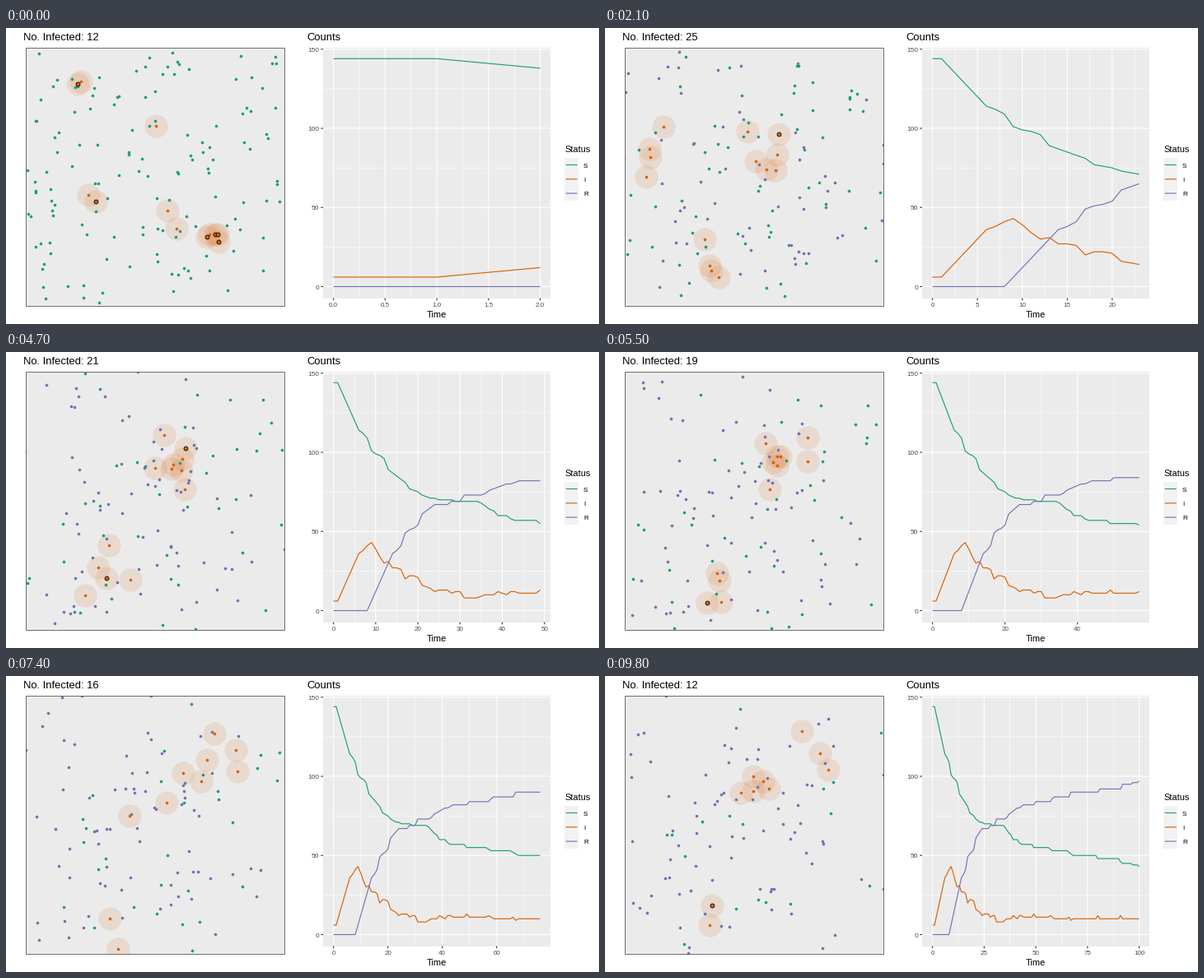
Recreate the animation shown at these times as a matplotlib script. Size 720 by 360 pixels, loop 9900 ms.

```python
import numpy as np
import matplotlib.pyplot as plt
from matplotlib.animation import FuncAnimation
from matplotlib.collections import LineCollection
from matplotlib.patches import Rectangle

plt.rcParams["font.family"] = "Liberation Sans"

N, LAST, FIRST = 150, 100, 2
GREEN, ORANGE, PURPLE = "#1B9E77", "#D95F02", "#7570B3"
GREY, DARK = "#EBEBEB", "#333333"
BOX = (24, 24, 314, 314)
PANEL = (385.05, 24.0, 276.1, 304.5)
LO, SPAN = 26.0, 310.0
MIDDLE = np.array([181.0, 181.0])
DAYS = np.arange(LAST + 1)


# ---- epidemic counts: straight runs between key points, in whole people ----
def runs(*points):
    t, v = zip(*points)
    return np.rint(np.interp(DAYS, t, v)).astype(int)


S = runs((0, 144), (1, 144), (2, 138), (5, 120), (6, 114), (8, 109), (9, 101),
         (12, 96), (13, 89), (17, 81), (18, 77), (23, 71), (30, 69), (34, 69),
         (38, 63), (39, 60), (41, 60), (43, 57), (48, 57), (49, 55), (56, 55),
         (58, 53), (65, 53), (68, 50), (79, 50), (80, 48), (90, 48), (92, 45),
         (96, 45), (100, 43))
R = runs((24, 67), (27, 67), (28, 69), (30, 69), (31, 73), (35, 73), (39, 78),
         (44, 82), (49, 82), (50, 84), (57, 84), (59, 87), (66, 87), (67, 90),
         (80, 90), (81, 92), (91, 92), (92, 95), (96, 95), (100, 97))
# early cases recover exactly eight steps after infection
R[:9] = 0
R[9:25] = N - S[1:17]
I = N - S - R


def headline(t):
    return I[t] if t <= 14 else round(25.4 - 0.175 * (t - 23))


# ---- agents: numbered in the order in which they fall ill ----
FIRST_CASES = [(91, 65), (182, 119), (100, 203), (196, 222), (207, 244), (247, 251)]
FIRST_PARENTS = [0, 2, 5, 5, 5, 5]
OUTBREAK_DAYS = (23, 45, 66, 86, 100)
OUTBREAKS = [
    [(125, 270), (114, 271), (122, 308), (127, 296), (144, 284)],
    [(195, 152), (212, 120), (215, 130), (250, 125), (180, 130)],
    [(45, 150), (232, 125), (262, 90), (285, 60), (260, 80)],
]

rng = np.random.default_rng(7)


def fold(p):
    """Reflect a point back into the box."""
    return LO + SPAN - np.abs(SPAN - (p - LO) % (2 * SPAN))


def outbreak_at(k, t):
    return np.array([np.interp(t, OUTBREAK_DAYS, c) for c in zip(*OUTBREAKS[k])])


def first_place(i):
    if i < 6:
        return np.array(FIRST_CASES[i], float)
    if i < 12:
        return np.array(FIRST_CASES[FIRST_PARENTS[i - 6]]) + rng.normal(0, 6, 2)
    return rng.uniform(LO, LO + SPAN, 2)


def find_pins(i):
    """Times and places that an agent's random walk has to pass through."""
    caught = int(np.argmax(N - S > i))
    if i >= N - S[LAST]:
        # those never infected drift away from the crowd
        start = first_place(i)
        return {FIRST: start, LAST: MIDDLE + 1.45 * (start - MIDDLE)}
    if caught < 16:
        return {FIRST: first_place(i)}
    healed = int(np.argmax(R > i)) or LAST
    k = rng.choice(3, p=[0.22, 0.39, 0.39])
    offset = rng.normal(0, 18, 2)
    pins = {t: fold(outbreak_at(k, t) + offset) for t in (caught, healed)}
    pins[FIRST] = fold(pins[caught] + rng.normal(0, 100, 2))
    return pins


def make_paths():
    paths = np.cumsum(rng.normal(0, 5.5, (LAST + 1, N, 2)), axis=0)
    for i in range(N):
        pins = find_pins(i)
        times = sorted(pins)
        shift = np.array([pins[t] - paths[t, i] for t in times])
        for d in range(2):
            paths[:, i, d] += np.interp(DAYS, times, shift[:, d])
    return paths


PATHS = make_paths()


# ---- axis breaks ----
def break_step(lo, hi):
    """Step of the best scoring labelling (simplicity, coverage, density)."""
    best, choice = -1e9, 1
    for rank, q in enumerate([1, 5, 2, 2.5, 4, 3]):
        for power in (-2, -1, 0, 1, 2):
            step = q * 10.0 ** power
            for k in range(2, 13):
                for start in (-step, 0):
                    end = start + (k - 1) * step
                    miss = (hi - end) ** 2 + (lo - start) ** 2
                    cover = 1 - 0.5 * miss / (0.1 * (hi - lo)) ** 2
                    ratio = (max(end, hi) - min(start, lo)) / step / 4
                    dense = 2 - max(ratio, 1 / ratio)
                    score = 0.25 * (1 - rank / 5) + 0.2 * cover + 0.5 * dense
                    if score > best + 1e-9:
                        best, choice = score, step
    return choice


def x_pix(v, t):
    return 397.6 + 251.0 * np.asarray(v) / t


def y_pix(v):
    return 314.5 - 1.925 * np.asarray(v)


# ---- fixed drawing ----
fig = plt.figure(figsize=(10, 5), dpi=72, facecolor="white")
ax = fig.add_axes([0, 0, 1, 1])
ax.set_xlim(0, 720)
ax.set_ylim(360, 0)
ax.axis("off")


def rect(x, y, w, h, **kw):
    return ax.add_patch(Rectangle((x, y), w, h, **kw))


def label(x, y, s, size, color="black", ha="left"):
    return ax.text(x, y, s, fontsize=size, color=color, ha=ha, va="baseline")


def line_set(color, width, z=2):
    lines = LineCollection([], colors=color, linewidths=width, zorder=z, snap=False)
    return ax.add_collection(lines, autolim=False)


def curve(color, z, xs=(), ys=()):
    return ax.plot(xs, ys, color=color, lw=1.15, solid_capstyle="butt",
                   zorder=z, snap=False)[0]


def verticals(xs, y0, y1):
    return [[(x, y0), (x, y1)] for x in xs]


def horizontals(ys, x0, x1):
    return [[(x0, y), (x1, y)] for y in ys]


field = rect(*BOX, fc=GREY, ec="none", zorder=1)
rect(*BOX, fc="none", ec="#606060", lw=0.9, zorder=8)
rect(*PANEL, fc=GREY, ec="none", zorder=1)

left, top = PANEL[:2]
right, bottom = left + PANEL[2], top + PANEL[3]
levels = np.arange(0, 151, 50)
line_set("white", 0.55).set_segments(horizontals(y_pix(levels[:3] + 25), left, right))
line_set("white", 1.1).set_segments(horizontals(y_pix(levels), left, right))
line_set(DARK, 1.07).set_segments(horizontals(y_pix(levels), left - 2.75, left))
for v in levels:
    label(380, y_pix(v) + 3.1, str(v), 8.2, "#4D4D4D", "right")

label(365, 14.6, "Counts", 13)
label(523, 352, "Time", 11, ha="center")
label(678, 151, "Status", 11)
for k, (name, color) in enumerate(zip("SIR", (GREEN, ORANGE, PURPLE))):
    y = 166.5 + 17.28 * k
    rect(678, y - 8.64, 17.28, 17.28, fc="#F2F2F2", ec="none", zorder=1)
    curve(color, 3, [679.7, 693.6], [y, y])
    label(701, y + 3.1, name, 8.2)


# ---- moving parts ----
def dots(size, color, z, **kw):
    marks = ax.scatter([], [], s=size ** 2, color=color, zorder=z, snap=False,
                       **{"linewidths": 0, **kw})
    marks.set_clip_path(field)
    return marks


halos = dots(28.4, ORANGE, 3, alpha=0.12)
susceptible = dots(3.6, GREEN, 4)
ill = dots(3.6, ORANGE, 5)
recovered = dots(3.6, PURPLE, 6)
fresh = dots(5.0, ORANGE, 7, linewidths=0.8, edgecolors="black")

title = label(21, 14.6, "", 13)
minor = line_set("white", 0.55)
major = line_set("white", 1.1)
ticks = line_set(DARK, 1.07)
tick_text = [label(0, 339, "", 8.0, "#4D4D4D", "center") for _ in range(14)]
curves = [(curve(GREEN, 4), S), (curve(ORANGE, 5), I), (curve(PURPLE, 6), R)]


def draw_axis(t):
    step = break_step(-0.05 * t, 1.05 * t)
    marks = np.arange(0, 1.05 * t + 1e-6, step)
    halves = np.arange(step / 2, 1.05 * t + 1e-6, step)
    xs = x_pix(marks, t)
    major.set_segments(verticals(xs, top, bottom))
    minor.set_segments(verticals(x_pix(halves, t), top, bottom))
    ticks.set_segments(verticals(xs, bottom, bottom + 2.75))
    form = "{:.0f}" if step == int(step) else "{:.1f}"
    for k, text in enumerate(tick_text):
        shown = k < len(marks)
        text.set_text(form.format(marks[k]) if shown else "")
        text.set_x(xs[k] if shown else 0)


def update(frame):
    t = frame + FIRST
    pos = PATHS[t]
    r, s, new = R[t], N - S[t], N - S[t - 1]
    recovered.set_offsets(pos[:r])
    ill.set_offsets(pos[r:s])
    halos.set_offsets(pos[r:s])
    fresh.set_offsets(pos[new:s])
    susceptible.set_offsets(pos[s:])
    title.set_text(f"No. Infected: {headline(t)}")
    draw_axis(t)
    xs = x_pix(DAYS[:t + 1], t)
    for line, data in curves:
        line.set_data(xs, y_pix(data[:t + 1]))
    return []


anim = FuncAnimation(fig, update, frames=LAST - FIRST + 1, interval=100,
                     init_func=lambda: [], repeat=True, blit=False)
plt.show()
```
